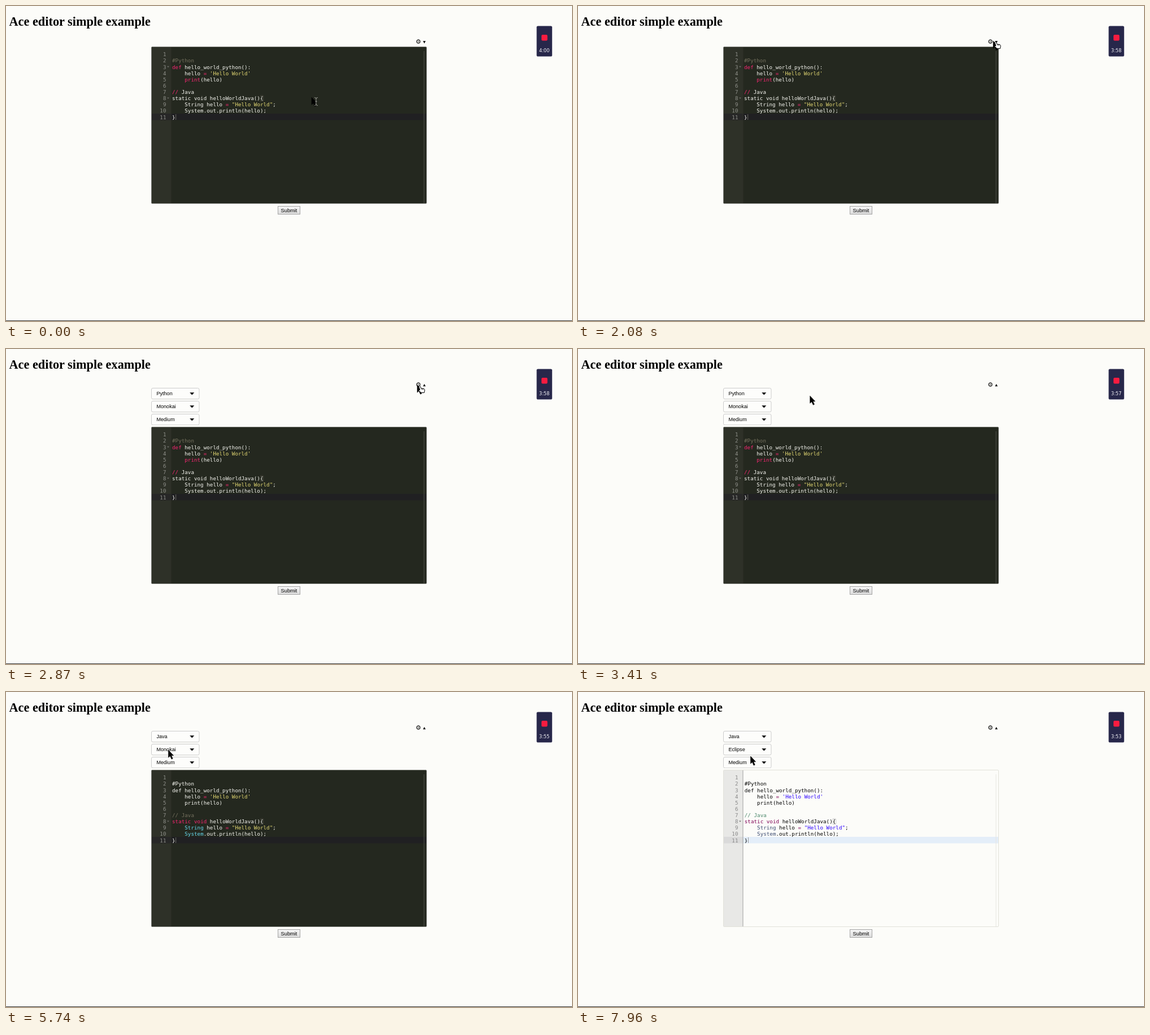
An HTML page for the animation above (8000 ms loop, 1002x559 px).

```html
<!DOCTYPE html>
<html lang="en">
<head>
<meta charset="utf-8">
<title>Ace editor simple example</title>
<style>
html, body { margin: 0; width: 100%; height: 100%; overflow: hidden; background: #fcfcf9; }
svg { display: block; width: 1002px; height: 559px; }
text { white-space: pre; }
.ui { font: 9.1px "Liberation Sans", Arial, sans-serif; }
.code { font: 9.26px "DejaVu Sans Mono", monospace; }

.dark {
  --bg: #24281f; --edge: #7c7e78; --gutter: #2e3128; --rule: #2e3128; --margin: #4c4e48;
  --line: #202022; --gutter-line: #272727; --number: #8f908a; --text: #f8f8f2; --bracket: #49483e;
  --comment: #75715e; --keyword: #f92672; --string: #e6db74; --type: #66d9ef; --caret: #66665f; --fold: #6c6d68;
}
.light {
  --bg: #fcfcf9; --edge: #e2e2da; --gutter: #e8e8e6; --rule: #9f9f9f; --margin: #e6e6e2;
  --line: #e4eef9; --gutter-line: #dadada; --number: #888; --text: #000; --bracket: #c0c0c0;
  --comment: #4c886b; --keyword: #7f0055; --string: #2a00ff; --type: #3c4c72; --caret: #999; --fold: #777;
}
#code { fill: var(--text); }
#code .number { fill: var(--number); text-anchor: end; }
.comment { fill: var(--comment); }
.keyword { fill: var(--keyword); }
.string { fill: var(--string); }
.type { fill: var(--type); }
</style>
</head>
<body>
<svg id="stage" class="dark" viewBox="0 0 1002 559">
  <defs>
    <linearGradient id="button" x2="0" y2="1"><stop stop-color="#f6f6f6"/><stop offset="1" stop-color="#dcdcdc"/></linearGradient>
    <clipPath id="panelClip"><rect id="panelBox" x="250" y="66" width="100" height="0"/></clipPath>
  </defs>
  <rect y="558" width="1002" height="1" fill="#333"/>
  <text x="5.5" y="35" font-family="Liberation Serif, Times New Roman, serif" font-weight="bold" font-size="22.3">Ace editor simple example</text>

  <text x="725" y="66.5" font-family="DejaVu Sans, sans-serif" font-size="11.1">⚙</text>
  <path id="toggle"/>

  <g clip-path="url(#panelClip)"><g id="panel" class="ui"></g></g>

  <g id="editor">
    <rect x="257.5" y="72.5" width="487" height="278" rx="1.5" fill="var(--bg)" stroke="var(--edge)"/>
    <rect x="258" y="73" width="34" height="277" fill="var(--gutter)"/>
    <rect x="292" y="191" width="452" height="11.5" fill="var(--line)"/>
    <rect x="258" y="191" width="34" height="11.5" fill="var(--gutter-line)"/>
    <rect x="291.5" y="73" width="1" height="277" fill="var(--rule)"/>
    <rect x="739.5" y="80" width="1" height="270" fill="var(--margin)"/>
    <g id="code" class="code"></g>
    <rect x="481.5" y="355.5" width="39" height="14" fill="url(#button)" stroke="#a4a4a4"/>
    <text x="501" y="366" text-anchor="middle" class="ui" style="font-size:9.29px">Submit</text>
  </g>

  <rect x="939.4" y="35.4" width="27.4" height="54.2" rx="2.2" fill="#27274a"/>
  <rect x="948" y="51" width="10.5" height="10.5" rx="2" fill="#f81c40"/>
  <text id="timer" x="953" y="82" text-anchor="middle" fill="#f4f4f8" font-family="DejaVu Sans, sans-serif" font-size="8.2"></text>

  <g id="ripple" fill="none" transform="translate(737 64)">
    <circle id="outerRing" stroke="#e3a9d2" stroke-width="2"/>
    <circle id="innerRing" stroke="#e6cfc6" stroke-width="1.2"/>
  </g>

  <g id="pointer">
    <path d="M0 0V13.2L3 10.6 5.6 16.2 7.8 15.2 5.3 9.8H9.2Z" stroke="#000" stroke-width=".5"/>
    <path id="beam" d="M5 .5Q8 .5 8 2.5V12.5Q8 14.5 5 14.5M11 .5Q8 .5 8 2.5M8 12.5Q8 14.5 11 14.5M6.5 7.5H9.5" fill="none" stroke="#9a9a94"/>
    <path id="hand" d="M3.5 1.5Q4.7 .8 5.3 2L6.8 6 11 6.3Q13.3 6.8 13.2 9L12.4 13.5H6.8L2.6 9.4Q2.6 7.8 4.8 8.8L3 3Q2.8 2 3.5 1.5ZM8.2 6.2V8M10.2 6.4V8" fill="#fff" stroke="#000"/>
  </g>
</svg>
<script>
const $ = id => document.getElementById(id);
const DURATION = 8000;
const PANEL_HEIGHT = 66;
const CHAR = 5.575, ROW = 11.13;

const SOURCE = `
#Python
def hello_world_python():
    hello = 'Hello World'
    print(hello)

// Java
static void helloWorldJava(){
    String hello = "Hello World";
    System.out.println(hello);
}`.split("\n");

const LANGUAGES = {
  Python: {
    tokens: /(?<comment>#.*)|(?<string>'.*?'|".*?")|(?<keyword>\bdef\b|\bprint\b|\/\/|=)/g,
    folds: [3, 8]
  },
  Java: {
    tokens: /(?<comment>\/\/.*)|(?<string>'.*?'|".*?")|(?<keyword>\bstatic\b|\bvoid\b|=)|(?<type>\bString\b|\bSystem\b)/g,
    folds: [8]
  }
};

// Pointer tip: time, x, y
const PATH = [
  [0, 541, 162], [430, 541, 162], [1210, 700, 100], [1270, 700, 100], [1830, 735, 62],
  [2840, 735, 62], [2870, 728, 64], [3640, 330, 88], [3680, 330, 88], [4130, 307.5, 73],
  [5280, 307.5, 73], [5740, 287.5, 103], [6050, 303, 97], [7500, 303, 97], [7960, 305.5, 114]
];
const TICKS = [1010, 2020, 3050, 4080, 5130, 6110, 7120];

const progress = (t, start, end) => Math.min(1, Math.max(0, (t - start) / (end - start)));
const swing = p => (1 - Math.cos(Math.PI * p)) / 2;
const show = (id, visible) => $(id).setAttribute("visibility", visible ? "visible" : "hidden");

function pointerAt(t) {
  const next = PATH.findIndex(key => key[0] > t);
  if (next < 0) return PATH[PATH.length - 1].slice(1);
  const [t0, x0, y0] = PATH[next - 1], [t1, x1, y1] = PATH[next];
  const p = swing(progress(t, t0, t1));
  return [x0 + (x1 - x0) * p, y0 + (y1 - y0) * p];
}

function highlight(line, tokens) {
  return line.replace(tokens, (match, ...rest) => {
    const kind = Object.entries(rest.pop()).find(([, value]) => value)[0];
    return `<tspan class="${kind}">${match}</tspan>`;
  });
}

function renderCode(language, left) {
  const { tokens, folds } = LANGUAGES[language];
  const rows = SOURCE.map((line, i) => {
    const y = 89.3 + i * ROW;
    return `<text class="number" x="283.5" y="${y}">${i + 1}</text>
      <text x="${left}" y="${y}">${highlight(line, tokens)}</text>`;
  });
  const marks = folds.map(n =>
    `<path d="M285 ${84.5 + (n - 1) * ROW}h4l-2 2.4z" fill="var(--fold)"/>`);
  $("code").innerHTML = rows.join("") + marks.join("") +
    `<rect x="${left + 28 * CHAR}" y="158.8" width="5.6" height="10" rx="1" fill="none" stroke="var(--bracket)" stroke-width=".8"/>
     <rect x="${left + CHAR + .6}" y="192" width="1" height="10" fill="var(--caret)"/>`;
}

function renderPanel(labels) {
  $("panel").innerHTML = labels.map((label, i) => {
    const y = 69 + 23 * i;
    return `<rect x="257.5" y="${y + .5}" width="84.5" height="19.3" rx="2.5" fill="#fdfdfb" stroke="#ccc"/>
      <text x="266.4" y="${y + 13.3}">${label}</text>
      <path d="M325.3 ${y + 8.2}h8l-4 4.2z"/>`;
  }).join("");
}

let rendered = "";
function setOptions(language, theme) {
  const key = language + theme;
  if (key === rendered) return;
  rendered = key;
  const light = theme === "Eclipse";
  $("stage").setAttribute("class", light ? "light" : "dark");
  renderPanel([language, theme, "Medium"]);
  renderCode(language, light ? 294.8 : 294);
}

function draw(t) {
  setOptions(t < 5320 ? "Python" : "Java", t < 7540 ? "Monokai" : "Eclipse");

  const open = swing(progress(t, 2267, 2667));
  const shift = Math.round(PANEL_HEIGHT * open);
  $("editor").setAttribute("transform", `translate(0 ${shift})`);
  $("panelBox").setAttribute("height", open ? 3 + shift : 0);
  $("panel").setAttribute("opacity", open);
  $("toggle").setAttribute("d", open ? "M738.3 66.3h4.6l-2.3-4.4z" : "M738.3 62h4.6l-2.3 4.4z");

  const seconds = 240 - TICKS.filter(tick => tick <= t).length;
  $("timer").textContent = `${Math.floor(seconds / 60)}:${String(seconds % 60).padStart(2, "0")}`;

  const [x, y] = pointerAt(t);
  const inEditor = x > 253 && x < 740 && y > 68 + shift;
  $("pointer").setAttribute("transform", `translate(${x} ${y})`);
  show("beam", inEditor);
  show("hand", !inEditor && x > 720 && y < 70);

  const spread = progress(t, 2160, 2640);
  show("ripple", spread > 0 && spread < 1);
  $("ripple").setAttribute("opacity", 1 - spread);
  $("outerRing").setAttribute("r", 4 + 24 * spread);
  $("innerRing").setAttribute("r", 1 + 23 * spread);
}

function frame(now) {
  draw(now % DURATION);
  requestAnimationFrame(frame);
}
draw(0);
requestAnimationFrame(frame);
</script>
</body>
</html>
```
